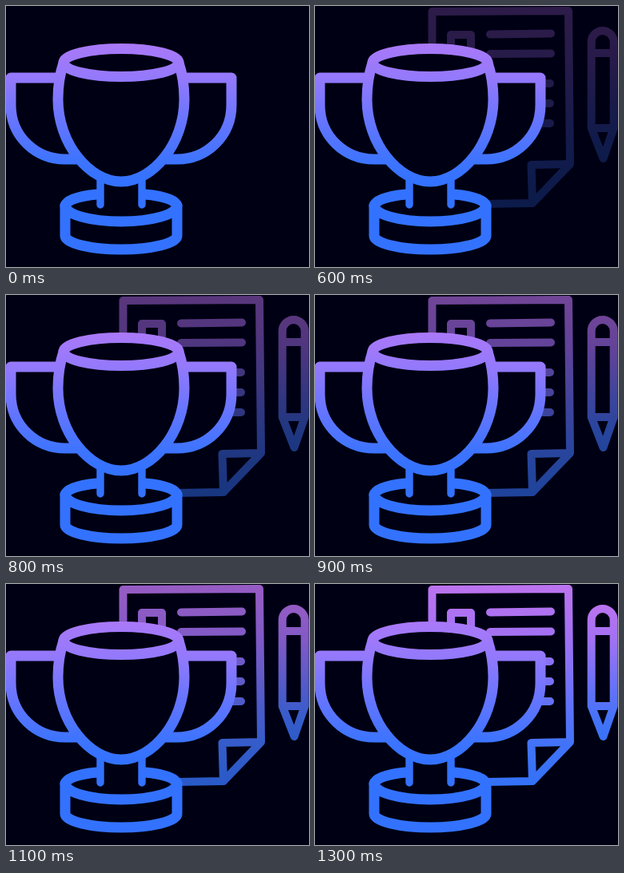
An HTML page that plays this animation: 379 px wide and 327 px high, repeating every 3300 ms.

```html
<!DOCTYPE html>
<html lang="en">
<head>
<meta charset="utf-8">
<title>Trophy</title>
<style>
  html, body { margin: 0; width: 100%; height: 100%; overflow: hidden; background: #000014; }
  svg { display: block; width: 379px; height: 327px; }
  path, ellipse { stroke-linecap: round; stroke-linejoin: round; }
  .notes { fill: none; stroke: url(#ink); stroke-width: 10; opacity: 0; animation: appear 3300ms infinite; }
  .pencil { stroke: url(#lead); }
  .cup { fill: #000014; stroke: url(#glow); stroke-width: 13; }
  .open { fill: none; }
  .stem { stroke-width: 9.4; }
  /* steps of 100 ms from 500 ms on, a little slower after 1000 ms */
  @keyframes appear {
    0% { opacity: 0; animation-timing-function: step-end; }
    15.1515% { opacity: 0; animation-timing-function: steps(5, jump-start); }
    30.303% { opacity: .6; animation-timing-function: steps(4, jump-start); }
    42.4242%, 100% { opacity: 1; }
  }
</style>
</head>
<body>
<svg viewBox="0 0 379 327">
  <defs>
    <linearGradient id="glow" gradientUnits="userSpaceOnUse" x1="0" y1="47" x2="0" y2="220">
      <stop offset="0" stop-color="#aa79f8"/>
      <stop offset=".25" stop-color="#9479fc"/>
      <stop offset=".58" stop-color="#6475ff"/>
      <stop offset=".83" stop-color="#4074ff"/>
      <stop offset="1" stop-color="#3372ff"/>
    </linearGradient>
    <linearGradient id="ink" gradientUnits="userSpaceOnUse" x1="0" y1="2" x2="0" y2="250">
      <stop offset="0" stop-color="#bd73ef"/>
      <stop offset=".25" stop-color="#a371f3"/>
      <stop offset=".6" stop-color="#6172f8"/>
      <stop offset=".8" stop-color="#4273f8"/>
      <stop offset="1" stop-color="#3471f6"/>
    </linearGradient>
    <linearGradient id="lead" href="#ink" y1="22" y2="210"/>
  </defs>

  <g class="notes">
    <path d="M146.500 60V7L317 6L319 198L272 247L214 248M319 198L270.500 199L272 247"/>
    <path d="M170 60V36H195V60"/>
    <path d="M219 35.500L295 34.500M219 60L295 59.500M260 97H294M260 122H294M260 147H294"/>
    <path class="pencil" d="M345.700 153V45a14 14 0 0 1 28 0V153L360.500 191ZM345.700 153H373.700M345.700 59H373.700"/>
  </g>

  <g class="cup">
    <path d="M80 90H6V124C6 164 38 192 74 192H95"/>
    <path d="M208 90H282V124C282 164 250 192 214 192H193"/>
    <path class="open" d="M74 250C76 243 92 238 114 236M214 250C212 243 196 238 174 236"/>
    <path d="M74 250C74 261 105 270 144 270S214 261 214 250V288C214 297 183 305 144 305S74 297 74 288Z"/>
    <path class="open stem" d="M118 215V249M170 215V249"/>
    <path d="M72 71C67 86 65 101 65 117C65 172 104 220 144 220S223 172 223 117C223 101 221 86 216 71"/>
    <ellipse cx="144" cy="71" rx="72" ry="17.500"/>
  </g>
</svg>
</body>
</html>
```
